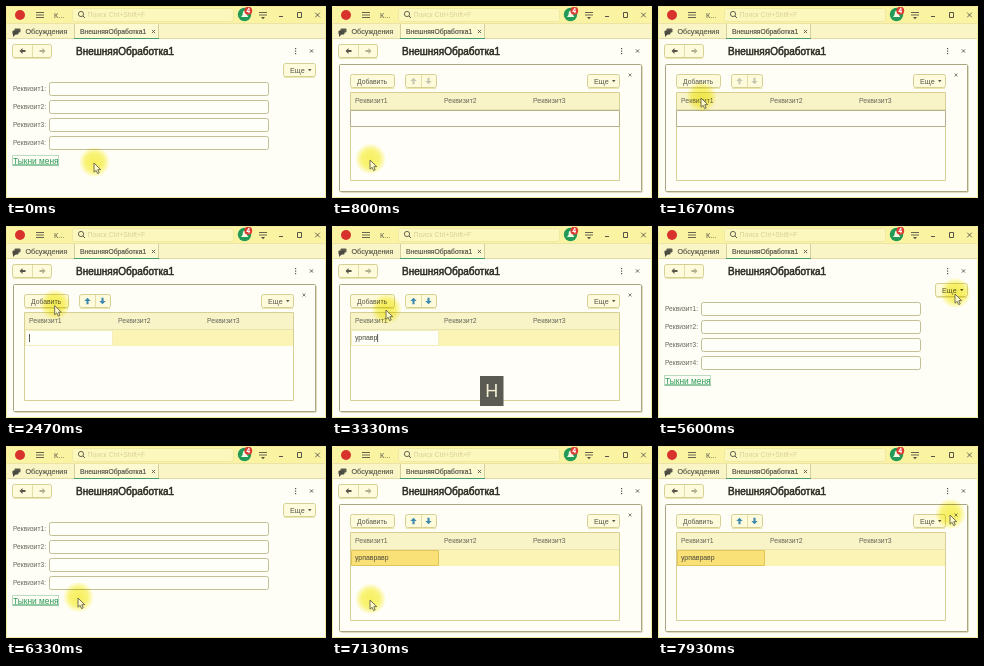
Animation, 320 px wide and 192 px high, one loop 8000 ms. Source, as an HTML page with a canvas:

```html
<!DOCTYPE html>
<html lang="ru">
<head>
<meta charset="utf-8">
<title>ВнешняяОбработка1</title>
<style>
html, body { margin: 0; width: 100%; height: 100%; overflow: hidden; background: #fffef6; }
canvas { display: block; width: 100vw; height: 100vh; }
</style>
</head>
<body>
<canvas id="stage"></canvas>
<script>
const W = 320, H = 192, LOOP = 8000;
const canvas = document.getElementById('stage');
const ctx = canvas.getContext('2d');
const FONT = '"Liberation Sans", Arial, sans-serif';
const INK = '#57554a', LINE = '#d6d095', PAPER = '#fffef6';

// Pointer stops: time, x, y
const PATH = [
  [0, 88, 157], [450, 38, 154], [900, 38, 154], [1670, 43, 92],
  [2050, 48, 79], [2400, 48, 79], [2750, 54, 84], [3850, 54, 84],
  [4600, 297, 76], [4850, 298, 69], [5200, 298, 69], [5600, 297, 68],
  [6330, 72, 152], [6700, 38, 154], [7200, 38, 154], [7930, 292, 69], [8000, 294, 69]
];
const TYPED = 'урпавравр', KEYS = 'EHGFDHF';
const OPEN = 700, ADD = 2300, TYPE = 2700, KEY_STEP = 112;
const COMMIT = 4050, KEY_HIDE = 4850, CLOSE = 5050, REOPEN = 7130;

function resize() {
  const dpr = window.devicePixelRatio || 1;
  canvas.width = Math.round(innerWidth * dpr);
  canvas.height = Math.round(innerHeight * dpr);
}

function rect(x, y, w, h, fill) {
  ctx.fillStyle = fill;
  ctx.fillRect(x, y, w, h);
}

function box(x, y, w, h, fill, stroke, r = 0) {
  ctx.beginPath();
  ctx.roundRect(x + .5, y + .5, w - 1, h - 1, r);
  if (fill) { ctx.fillStyle = fill; ctx.fill(); }
  if (stroke) { ctx.strokeStyle = stroke; ctx.lineWidth = 1; ctx.stroke(); }
}

function disc(x, y, r, fill) {
  ctx.beginPath();
  ctx.arc(x, y, r, 0, 7);
  ctx.fillStyle = fill;
  ctx.fill();
}

// Outline adds weight without changing the letter widths
function text(s, x, y, size, color = INK, outline = 0) {
  ctx.font = `${size}px ${FONT}`;
  ctx.fillStyle = color;
  ctx.fillText(s, x, y);
  if (outline) {
    ctx.strokeStyle = color;
    ctx.lineWidth = outline;
    ctx.strokeText(s, x, y);
  }
  return ctx.measureText(s).width;
}

function lines(points, color = INK, width = 1) {
  ctx.beginPath();
  for (const [x1, y1, x2, y2] of points) {
    ctx.moveTo(x1, y1);
    ctx.lineTo(x2, y2);
  }
  ctx.strokeStyle = color;
  ctx.lineWidth = width;
  ctx.stroke();
}

function poly(points, fill, stroke) {
  ctx.beginPath();
  points.forEach(([x, y]) => ctx.lineTo(x, y));
  ctx.closePath();
  ctx.fillStyle = fill;
  ctx.fill();
  if (stroke) { ctx.strokeStyle = stroke; ctx.lineWidth = .9; ctx.stroke(); }
}

function cross(x, y, r, color = INK) {
  lines([[x - r, y - r, x + r, y + r], [x - r, y + r, x + r, y - r]], color, .9);
}

// Arrow with a shaft; angle 0 points right
function arrow(x, y, angle, color, size) {
  ctx.save();
  ctx.translate(x, y);
  ctx.rotate(angle);
  ctx.scale(size, size);
  poly([[4, 0], [0, -4], [0, -1.3], [-4, -1.3], [-4, 1.3], [0, 1.3], [0, 4]], color);
  ctx.restore();
}

function button(x, y, w, h) {
  rect(x + 1, y + h, w - 2, 1, '#ebe6b0');
  box(x, y, w, h, '#fefbdc', LINE, 2);
}

function moreButton(x, y) {
  button(x, y, 33, 14);
  text('Еще', x + 7, y + 9.6, 7.2);
  poly([[x + 25, y + 6], [x + 28.5, y + 6], [x + 26.8, y + 8.2]], INK);
}

function drawTitleBar() {
  rect(0, 0, W, 17, '#faf3a2');
  disc(14, 9, 5, '#d8322c');
  lines([6.5, 9, 11.5].map(y => [30, y, 38, y]), INK, .9);
  text('К...', 48, 11.5, 7.2);
  box(66, 2, 162, 14, '#fcf8bd', '#f0e9a4', 2);
  ctx.beginPath();
  ctx.arc(75, 8, 2.6, 0, 7);
  ctx.strokeStyle = INK;
  ctx.lineWidth = .9;
  ctx.stroke();
  lines([[77, 10, 79, 12]]);
  text('Поиск Ctrl+Shift+F', 81.5, 11.3, 6.9, '#d9d196');
  disc(238.5, 8.5, 6.7, '#249a58');
  poly([[235, 11], [236.5, 9], [237, 5.5], [239, 4.5], [241, 6], [241, 9], [242.3, 11]], '#f6fbe4');
  disc(242.3, 4.7, 3.9, '#de3b31');
  text('4', 240.6, 7.1, 6.3, '#fff', .3);
  lines([[253, 6.5, 261, 6.5], [253, 9, 261, 9]], INK, .9);
  poly([[255, 11], [259, 11], [257, 13.2]], INK);
  lines([[273, 10.5, 277, 10.5]]);
  box(291, 6, 5, 6, null, INK);
  cross(311.5, 9, 2.3);
}

function drawTabs() {
  rect(0, 17, W, 16, '#f9f5c6');
  rect(0, 17, W, 1, '#ebe4a6');
  rect(0, 32, W, 1, '#e0daa4');
  box(8, 22, 7, 5, '#5c5a4c', null, 1);
  box(6, 24, 7, 5, '#4b4a40', null, 1);
  poly([[7, 28], [10, 28], [7, 31]], '#4b4a40');
  text('Обсуждения', 19.5, 28, 7.2, INK, .15);
  rect(68, 18, 85, 15, '#fdfad2');
  lines([[68.5, 18, 68.5, 33], [152.5, 18, 152.5, 33]], '#d6d0a0');
  text('ВнешняяОбработка1', 74, 28, 6.75, INK, .2);
  cross(147.5, 25.5, 1.6);
  rect(68, 32, 85, 1, '#459f70');
}

function drawHeader() {
  button(6, 38, 40, 14);
  lines([[26.5, 39, 26.5, 51]], '#e3dea9');
  arrow(16.5, 45, Math.PI, INK, .75);
  arrow(36.5, 45, 0, '#b3b08f', .75);
  text('ВнешняяОбработка1', 70, 48.8, 10, '#2c2b22', .5);
  for (const y of [42, 44.5, 47]) rect(289, y, 1.2, 1.2, INK);
  cross(305.5, 45, 1.6);
}

function drawForm() {
  moreButton(277, 57);
  for (let i = 0; i < 4; i++) {
    const y = 76 + i * 18;
    text(`Реквизит${i + 1}:`, 7, y + 9, 6.6, '#68665a');
    box(43, y, 220, 14, '#fffffa', '#c2be95', 2);
  }
  ctx.setLineDash([1, 1]);
  box(6, 149, 47, 11, null, '#79b98a');
  ctx.setLineDash([]);
  const w = text('Тыкни меня', 7, 157.6, 8.4, '#2b9a58');
  rect(7, 158.5, w, .8, '#2b9a58');
}

function drawRow(t, editing) {
  const count = editing ? Math.max(0, Math.min(TYPED.length, Math.floor((t - TYPE) / KEY_STEP) + 1)) : TYPED.length;
  rect(19, 104, 268, 16, '#fcf4b4');
  box(19, 104, 88, 16, editing ? '#fffffa' : '#f9e077', editing ? '#f3eebf' : '#e2c65a');
  const w = text(TYPED.slice(0, count), 23, 114.3, 6.9, '#4a483b');
  if (editing && (t < TYPE || t % 1000 < 600)) rect(23 + w, 108, .8, 8, '#333');
}

function drawPanel(t) {
  const filled = t >= ADD, editing = t >= ADD && t < COMMIT;
  box(8, 59, 303, 128, '#bdb98c', null, 1);
  box(7, 58, 303, 128, PAPER, '#aaa680', 1);
  cross(298, 69, 1.5, '#7d7a68');
  button(18, 68, 45, 14);
  text('Добавить', 25, 77.7, 6.8);
  button(73, 68, 32, 14);
  lines([[89.5, 69, 89.5, 81]], '#e3dea9');
  const blue = filled ? '#3c88ae' : '#c6c8b2';
  arrow(81.5, 75, -Math.PI / 2, blue, .8);
  arrow(96.5, 75, Math.PI / 2, blue, .8);
  moreButton(255, 68);
  box(18, 86, 270, 89, '#fffef8', LINE);
  rect(19, 87, 268, 17, '#f8f4c8');
  for (let i = 0; i < 3; i++) text(`Реквизит${i + 1}`, 23 + i * 89, 97.3, 6.9, '#68665a');
  rect(19, 103, 268, 1, '#e8e3b0');
  if (filled) drawRow(t, editing);
  else box(18, 104, 270, 17, '#fffef8', '#b5b18a');
}

function drawKey(t) {
  if (t < TYPE || t >= KEY_HIDE) return;
  const key = KEYS[Math.min(KEYS.length - 1, Math.floor((t - TYPE) / KEY_STEP))];
  ctx.font = `18px ${FONT}`;
  const w = ctx.measureText(key).width;
  rect(154.5 - w / 2, 150, w + 10.5, 30, '#5c5b53');
  text(key, 159.7 - w / 2, 171, 18, '#f2efd4');
}

function pointerAt(t) {
  let i = 1;
  while (i < PATH.length - 1 && t > PATH[i][0]) i++;
  const [t0, x0, y0] = PATH[i - 1], [t1, x1, y1] = PATH[i];
  const p = (t - t0) / (t1 - t0), e = p * p * (3 - 2 * p);
  return [x0 + (x1 - x0) * e, y0 + (y1 - y0) * e];
}

function drawPointer(t) {
  const [x, y] = pointerAt(t);
  const cx = x + .5, cy = y - 1;
  const glow = ctx.createRadialGradient(cx, cy, 0, cx, cy, 15);
  glow.addColorStop(0, '#f6f062');
  glow.addColorStop(.6, '#f9f47c');
  glow.addColorStop(1, '#fffef0');
  ctx.globalCompositeOperation = 'multiply';
  disc(cx, cy, 15, glow);
  ctx.globalCompositeOperation = 'source-over';
  const shape = [[0, 0], [0, 9.2], [2.1, 7.3], [3.6, 10.6], [5.2, 9.9], [3.8, 6.7], [6.7, 6.6]];
  poly(shape.map(([a, b]) => [x + a, y + b]), '#fdf9c8', '#66634e');
}

function draw(t) {
  ctx.setTransform(canvas.width / W, 0, 0, canvas.height / H, 0, 0);
  rect(0, 0, W, H, PAPER);
  drawTitleBar();
  drawTabs();
  drawHeader();
  const open = (t >= OPEN && t < CLOSE) || t >= REOPEN;
  if (open) drawPanel(t);
  else drawForm();
  drawKey(t);
  box(0, 0, W, H, null, '#f3ec9e');
  drawPointer(t);
}

const start = performance.now();
function tick() {
  draw((performance.now() - start) % LOOP);
  requestAnimationFrame(tick);
}
addEventListener('resize', resize);
resize();
tick();
</script>
</body>
</html>
```
